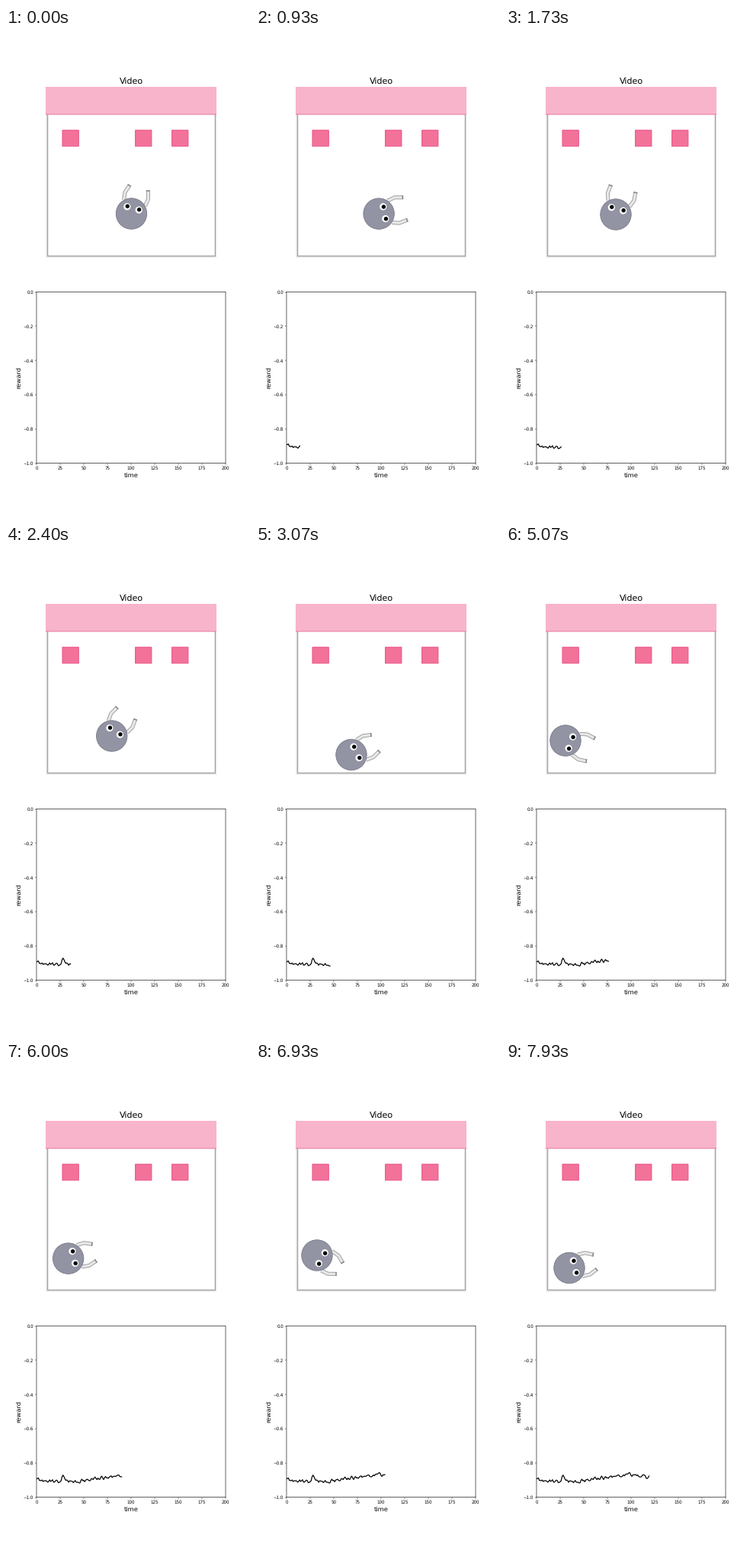
Write a matplotlib script that moves like this. It is 320 by 640 pixels and loops after 8000 ms.

```python
import numpy as np
import matplotlib.pyplot as plt
from matplotlib.animation import FuncAnimation
from matplotlib.patches import Circle, Rectangle

plt.rcParams["font.family"] = "DejaVu Sans"
plt.rcParams["text.hinting"] = "none"

STEPS = 120
FRAMES = STEPS + 1  # the last step is held for one more frame
LOOP_MS = 8000
PX = 72 / 40  # points per stage pixel

# step, x, y, heading (degrees clockwise from up), gripper opening
POSES = np.array([
    (0, 164.5, 243, 16, 8),
    (12, 163, 243, 86, 14),
    (26, 144, 244, 16, 20),
    (30, 146, 237, 16, 16),
    (46, 125, 274.5, 64, 6),
    (58, 92, 274.5, 18, -5),
    (76, 78, 256, 110, 17),
    (86, 82, 258, 68, 6),
    (104, 80, 253, 120, -4),
    (112, 82, 252, 62, 6),
    (119, 83, 269.5, 77, 0),
])


def pose_at(step):
    """Ease from one key pose to the next."""
    i = min(np.searchsorted(POSES[:, 0], step, "right"), len(POSES) - 1)
    a, b = POSES[i - 1], POSES[i]
    t = (step - a[0]) / (b[0] - a[0])
    t = 0.5 * t + 0.5 * t * t * (3 - 2 * t)
    return (a + (b - a) * t)[1:]


def reward_curve():
    """Slow trend with one bump and jittery noise."""
    k = np.arange(STEPS)
    trend = np.interp(k, [0, 10, 45, 97, 119],
                      [-0.893, -0.911, -0.909, -0.864, -0.884])
    bump = 0.04 * np.exp(-((k - 28.5) / 1.8) ** 2)
    noise = np.random.default_rng(4).uniform(-0.013, 0.013, STEPS)
    noise[1:] = 0.7 * noise[1:] + 0.4 * noise[:-1]
    noise[0] = 0
    return k, trend + bump + noise


fig, (room, plot) = plt.subplots(2, 1, figsize=(8, 16), dpi=40,
                                 facecolor="white")

room.set_xlim(52, 276)
room.set_ylim(300.8, 76.8)
room.set_aspect("equal")
room.axis("off")
room.set_title("Video", fontsize=20, pad=7.5)


def box(x, y, w, h, color, z=1, **kw):
    room.add_patch(Rectangle((x, y), w, h, fc=color, zorder=z, **kw))


def wall(inset, color, width):
    left, right, bottom = 54.6 - inset, 274.4 + inset, 298.4 + inset
    room.plot([left, left, right, right], [113, bottom, bottom, 113],
              color=color, lw=width * PX, solid_joinstyle="miter", zorder=1)


wall(1.2, "#e0e0e0", 1.6)
wall(0, "#a4a4a4", 1.3)
box(52, 76.8, 224, 36.2, "#f8b4ca", 2)
box(52, 112.4, 224, 1.2, "#ec83ab", 2)
for left in (74, 169.6, 217.6):
    box(left, 133.8, 21.3, 21, "#f37299", ec="#ea5288", lw=1 * PX)


def stroke(color, width, z):
    return room.plot([], [], color=color, lw=width * PX, zorder=z,
                     solid_capstyle="butt", solid_joinstyle="round")[0]


def disc(radius, z, **kw):
    return room.add_patch(Circle((0, 0), radius, zorder=z, **kw))


arms = [(stroke("#999999", 5, 3), stroke("#e8e8e8", 3.2, 4),
         stroke("#858585", 5, 5)) for _ in range(2)]
body = disc(20.2, 6, fc="#9293a3", ec="#7c7d8b", lw=0.9 * PX)
eyes = [(disc(4.6, 7, fc="white", ec="none"),
         disc(2.7, 8, fc="black", ec="none")) for _ in range(2)]

steps, reward = reward_curve()
curve, = plot.plot([], [], color="black", lw=2.2)
plot.set_xlim(0, 200)
plot.set_ylim(-1, 0)
plot.set_xticks(range(0, 201, 25))
plot.set_xlabel("time", fontsize=15)
plot.set_ylabel("reward", fontsize=15)
for spine in plot.spines.values():
    spine.set_linewidth(1.1)

# Keep edges at their true subpixel places
for part in [*plot.spines.values(), *room.patches, *room.lines]:
    part.set_snap(False)


def arm_points(side, opening):
    """Shoulder, elbow and tip of one arm as (right, forward)."""
    points = [np.array([14.5, 14.5])]
    for length, angle in ((10, opening), (11.5, opening - 25)):
        a = np.radians(angle)
        points.append(points[-1] + length * np.array([np.sin(a), np.cos(a)]))
    return np.array(points) * [side, 1]


def update(frame):
    step = min(frame, STEPS - 1)
    x, y, heading, opening = pose_at(step)
    h = np.radians(heading)
    axes = np.array([[np.cos(h), np.sin(h)], [np.sin(h), -np.cos(h)]])

    def place(points):
        return np.asarray(points) @ axes + (x, y)

    body.center = x, y
    for side, arm, (white, pupil) in zip((-1, 1), arms, eyes):
        pts = place(arm_points(side, opening))
        for line in arm[:2]:
            line.set_data(*pts.T)
        end = pts[2] - pts[1]
        arm[2].set_data(*np.array([pts[2] - 0.13 * end, pts[2]]).T)
        white.center = tuple(place((8 * side, 7.3)))
        pupil.center = tuple(place((8 * side + 0.3, 7.9)))
    shown = step + 1 if step else 0
    curve.set_data(steps[:shown], reward[:shown])
    return []


anim = FuncAnimation(fig, update, frames=FRAMES, interval=LOOP_MS / FRAMES,
                     init_func=lambda: update(0), repeat=True,
                     repeat_delay=0, blit=False)
plt.show()
```
